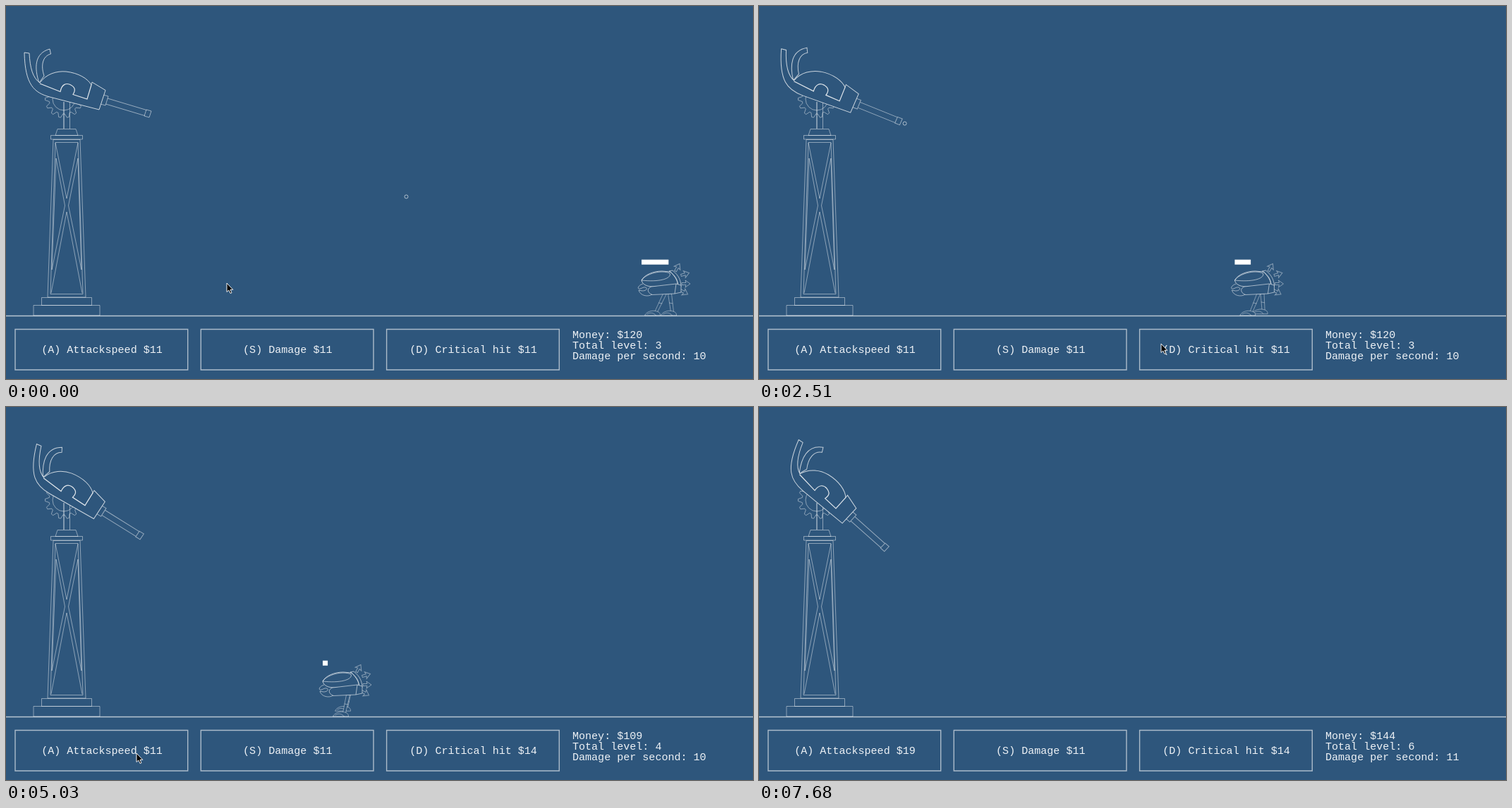
An HTML page with a canvas that plays this animation: 1059 px wide and 529 px high, repeating every 8 s.

```html
<!DOCTYPE html>
<html>
<head>
<meta charset="utf-8">
<style>
  html, body { margin: 0; width: 100%; height: 100%; overflow: hidden; background: #2e567c; }
  canvas { display: block; }
</style>
</head>
<body>
<canvas id="stage" width="1059" height="529"></canvas>
<script>
const ctx = document.getElementById('stage').getContext('2d');
const BG = '#2e567c', LOOP = 8000, STEP = 147.8;
const KILL = 43, BUY_CRIT = 18, BUY_SPEED = 36, BUY_SPEED_2 = 44;
const PIVOT = { x: 85, y: 124.5 }, REST = Math.atan2(242, 854);
const BULLET_SPEED = 120;

// [step, distance walked]
const WALK = [[0, 0], [12, 158.5], [21, 281], [28, 373.5], [34, 452], [41, 547.5], [KILL, 574]];
// [step, x, y]
const POINTER = [[0, 313, 393], [12, 317, 393], [16, 560, 476], [18, 580, 482], [21, 520, 475],
  [23, 485, 449], [28, 470, 446], [31, 440, 444], [34, 185, 491], [41, 182, 490], [47, 182, 492], [52, 181, 532]];
const SHOTS = [...Array(7).keys()].map(i => -3.18 + 6.71 * i).concat(41);
const STRAY_SHOT = 45.05;

const shape = d => new Path2D(d);
const tower = shape(`M39 424.5H133V439H39Z M50.5 413.5H121.5V424.5H50.5Z M67 189.5H105L113 413H59Z
  M70 193.5H102L109 408.5H63Z M70 194L86 273L102 194 M64 407L86 292L108 407
  M71 216L83.5 283L65 374Z M102 216L88.5 283L107 374Z
  M63.5 183.5H108.5V189H63.5Z M73 174.5H99L102 183.5H70Z M90.5 136V174`);
const post = shape('M82 136V174');
const ground = shape('M0 439.5H1059');
const gear = new Path2D();
for (let i = 0; i < 56; i++) {
  const a = (i - .5) * Math.PI / 28, r = i % 4 < 2 ? 26.5 : 21;
  gear.lineTo(82 + r * Math.cos(a), 132 + r * Math.sin(a));
}
gear.closePath();
gear.moveTo(98, 132);
gear.arc(82, 132, 16, 0, 7);

const fin = shape('M62 61L63.5 68C52 71 49 84 54 99L47 109C40 88 40 67 62 61Z');
const hull = shape(`M26 66L33 67C34 88 38 102 48 109C57 96 72 92 85 93C103 95 116 103 121 112
  L122 108L141 119.5L132 147L62 129C40 123 27 112 26 66Z`);
const panel = shape('M48 110L77 121.5C79 111 85 109 91 111.5C98 115 99 119 95 125.5L115 132L121 112');
const barrel = shape('M138 126L145 128L141 141L134 139Z M144 131L199 147.5 M141.5 139L196.5 155.5 M199 147L206 149L203 158L196 156Z');

const shell = shape('M901 389C905 381 918 376 930 376L942 377C949 384 952 390 953 396L917 398C909 398 902 395 901 389Z');
const lens = shape('M901 389C908 379 930 374 941 379C944 386 928 392 901 389');
const arm = shape('M915 398L950 394L957 396V406L948 408L916 409.5C908 406 909 400 915 398Z M950 394L948 408');
const claw = shape('M903 394C896 396 894 402 899 401L904 399C910 398 910 404 902 404L897 403C899 411 910 413 916 409');
const bands = shape('M940 376C949 382 952 388 952 394 M945 375C954 382 957 390 957 398 M940 376L945 375');
const spike = shape('M0 -1.5H6L5 -5L12 0L5 5L6 1.5H0Z');
const foot = shape('M-16 5C-14 -1 -4 -3 1 -1C5 0 6 2 6 5Z M-13 3C-8 0 -3 1 0 5');
const arrow = shape('M0 0V12.5L2.8 10L5 14.5L7 13.7L5 9.3H8.8Z');

function stroke(path, alpha = .55, width = 1, fill) {
  if (fill) { ctx.fillStyle = fill; ctx.fill(path); }
  ctx.strokeStyle = `rgba(255,255,255,${alpha})`;
  ctx.lineWidth = width;
  ctx.stroke(path);
}

function at(x, y, angle, draw) {
  ctx.save();
  ctx.translate(x, y);
  ctx.rotate(angle);
  draw();
  ctx.restore();
}

function sample(keys, n) {
  let i = 1;
  while (i < keys.length - 1 && n > keys[i][0]) i++;
  const a = keys[i - 1], b = keys[i];
  const f = Math.min(1, (n - a[0]) / (b[0] - a[0]));
  return a.slice(1).map((v, k) => v + (b[k + 1] - v) * f);
}

function text(s, x, y, align) {
  ctx.font = '15.05px "Liberation Mono", monospace';
  ctx.textAlign = align;
  ctx.fillStyle = '#eef2f6';
  ctx.fillText(s, x, y);
}

function button(x, label, pressed) {
  const box = new Path2D();
  box.rect(x, 458.5, 244.7, 57.5);
  stroke(box, .6, 1.4, pressed ? 'rgba(255,255,255,.1)' : BG);
  text(label, x + 123, 492, 'center');
}

function panelBar(n) {
  stroke(ground, .65, 1.3);
  const speedPrice = n < BUY_SPEED ? 11 : n < BUY_SPEED_2 ? 14 : 19;
  button(13, `(A) Attackspeed $${speedPrice}`, n === BUY_SPEED_2);
  button(276.3, '(S) Damage $11');
  button(539.6, `(D) Critical hit $${n < BUY_CRIT ? 11 : 14}`, n === BUY_CRIT);
  const bought = [BUY_CRIT, BUY_SPEED, BUY_SPEED_2].filter(b => n >= b).length;
  const money = 120 - [0, 11, 22, 36][bought] + (n >= KILL ? 60 : 0);
  text(`Money: $${money}`, 803, 471, 'left');
  text(`Total level: ${3 + bought}`, 803, 486, 'left');
  text(`Damage per second: ${n < BUY_SPEED ? 10 : 11}`, 803, 501, 'left');
}

function leg(phase) {
  const swing = Math.cos(phase), lift = 8 * Math.max(0, Math.sin(phase)) ** 3;
  const hip = 937.5 + 3.5 * swing, x = 933 + 11.5 * swing, y = 434 - lift;
  const midX = (hip + x) / 2, midY = (408 + y) / 2;
  stroke(shape(`M${hip - 2.5} 408L${x - 2} ${y}H${x + 2}L${hip + 2.5} 408Z
    M${midX - 2.5} ${midY}L${midX + 2.5} ${midY + 1}`), .4, 1, BG);
  at(x, y, 0, () => stroke(foot, .4, 1, BG));
}

function enemy(n, walked, hits) {
  at(-walked, 0, 0, () => {
    const phase = Math.PI * n / 4.02;
    leg(phase);
    leg(phase + Math.PI);
    for (const [x, y, a] of [[949, 376, -1.05], [957, 382, -.3], [958, 394, 0], [956, 403, .5]])
      at(x, y, a, () => stroke(spike, .42));
    stroke(shell, .65, 1, BG);
    stroke(lens, .55);
    stroke(bands, .55);
    stroke(arm, .55, 1, BG);
    stroke(claw, .5);
    ctx.fillStyle = '#fff';
    ctx.fillRect(901, 359.7, 38.3 - 5.2 * hits, 7);
  });
}

function bullet(x, y) {
  const dot = new Path2D();
  dot.arc(x, y, 2.5, 0, 7);
  stroke(dot, .6);
}

function draw(n) {
  ctx.fillStyle = BG;
  ctx.fillRect(0, 0, 1059, 529);
  const [walked] = sample(WALK, n);
  const aim = Math.atan2(242, 854 - walked), turn = aim - REST;
  const c = Math.cos(turn), s = Math.sin(turn);
  const muzzle = { x: PIVOT.x + 119.3 * c - 28.8 * s, y: PIVOT.y + 119.3 * s + 28.8 * c };

  stroke(tower, .45);
  stroke(gear, .45);
  stroke(post, .8);
  at(PIVOT.x, PIVOT.y, turn, () => {
    ctx.translate(-PIVOT.x, -PIVOT.y);
    stroke(barrel, .5);
    stroke(fin, .7, 1, BG);
    stroke(hull, .75, 1, BG);
    stroke(panel, .85, 1.2);
  });

  if (n < KILL) {
    const dx = 932 - walked - muzzle.x, dy = 388 - muzzle.y, dist = Math.hypot(dx, dy);
    const flights = SHOTS.map(t => BULLET_SPEED * (n - t));
    enemy(n, walked, flights.filter(d => d >= dist).length);
    for (const d of flights)
      if (d > 0 && d < dist - 30) bullet(muzzle.x + dx * d / dist, muzzle.y + dy * d / dist);
  }
  const stray = BULLET_SPEED * (n - STRAY_SHOT);
  const strayY = muzzle.y + stray * Math.sin(aim);
  if (stray > 0 && strayY < 439) bullet(muzzle.x + stray * Math.cos(aim), strayY);

  panelBar(n);
  const [px, py] = sample(POINTER, n);
  at(px, py, 0, () => stroke(arrow, .95, 1, '#000'));
}

function tick() {
  draw(Math.min(52, Math.floor((performance.now() % LOOP + 6) / STEP)));
  requestAnimationFrame(tick);
}
tick();
</script>
</body>
</html>
```
